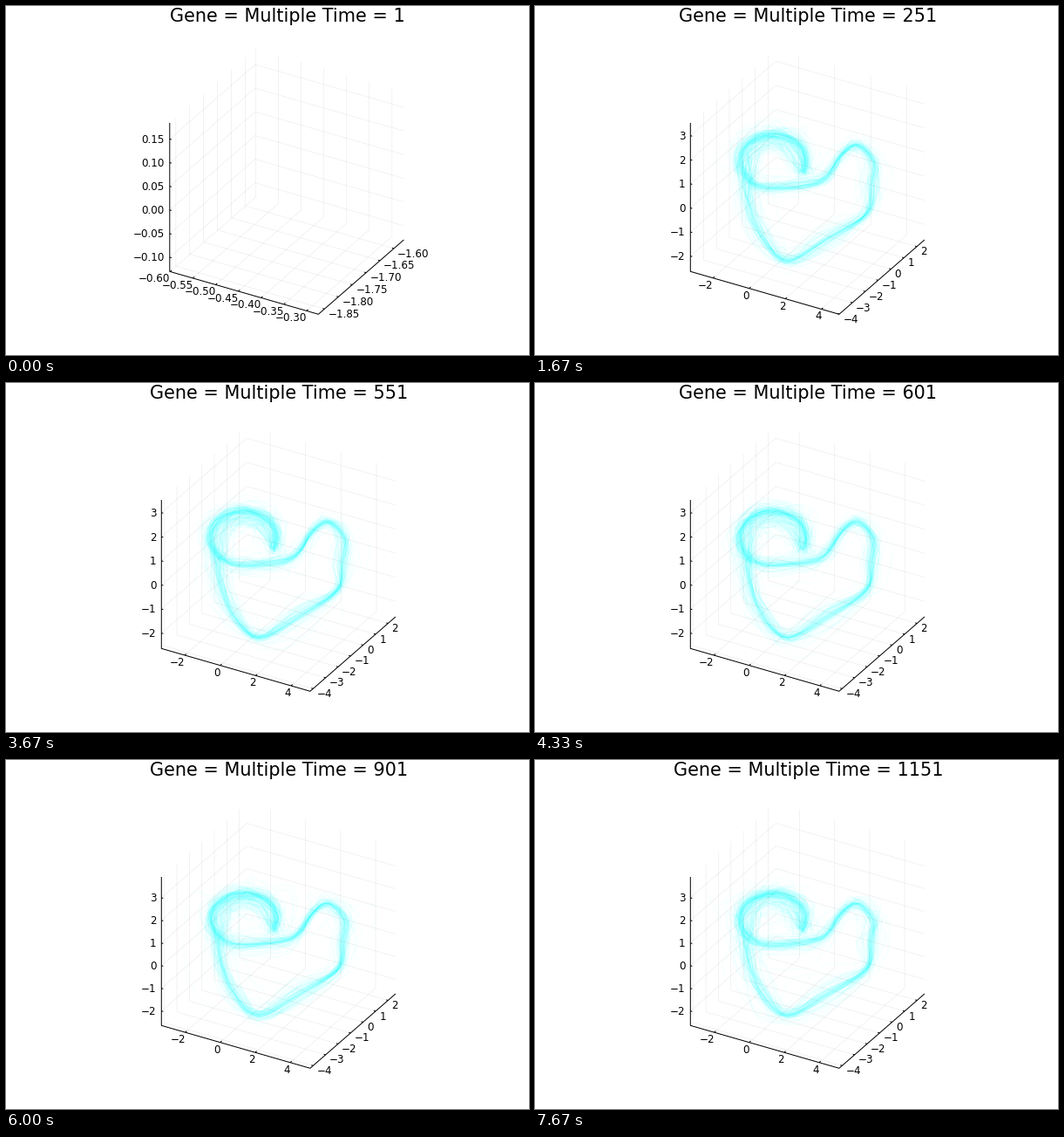
A matplotlib script for the animation above (8000 ms loop, 600 by 400 pixels).

```python
import numpy as np
import matplotlib.pyplot as plt
from matplotlib.animation import FuncAnimation
from matplotlib.collections import LineCollection

W, H, DPI = 600, 400, 100
PX = 72 / DPI
FRAMES, LOOP_MS = 24, 8000
STRANDS, DETAIL = 120, 5

# Screen directions of the three box edges
EDGE_X = np.array([170.6, 49.0])
EDGE_Y = np.array([98.0, -85.3])
EDGE_Z = np.array([0.0, -170.3])

# Key points of the long lobe on screen: x, y, spread
LOBE = np.array([
    (245, 225, 6), (261, 266, 6), (290, 292, 4), (335, 267, 7),
    (380, 238, 3), (386, 205, 6), (388, 178, 5), (370, 159, 4),
    (352, 170, 3), (334, 196, 4), (312, 205, 5)])
RING_CENTER, RING_RADII, RING_SPREAD = (273, 178), (38, 31), 5


def axis_limits(time):
    if time == 1:
        return (-0.601, -0.274), (-1.872, -1.564), (-0.130, 0.184)
    grown = min(time / 751, 1)
    return ((-3.2 - 0.16 * grown, 4.9 + 0.24 * grown),
            (-4.02 if time < 301 else -4.24, 2.6),
            (-2.64, 3.53 if time < 901 else 3.92))


def ticks(limits, step):
    low, high = limits
    first, last = np.ceil(low / step), np.floor(high / step)
    return [(v, (v - low) / (high - low))
            for v in np.arange(first, last + 1) * step]


def smooth_loop(points):
    """Closed Catmull-Rom curves; points has shape (strands, knots, 2)."""
    p0, p1, p2, p3 = (np.roll(points, s, axis=1)[:, :, None]
                      for s in (1, 0, -1, -2))
    u = np.linspace(0, 1, DETAIL, endpoint=False)[:, None]
    curve = 0.5 * (2 * p1 + (p2 - p0) * u
                   + (2 * p0 - 5 * p1 + 4 * p2 - p3) * u**2
                   + (3 * p1 - p0 - 3 * p2 + p3) * u**3)
    curve = curve.reshape(len(points), -1, 2)
    return np.concatenate([curve, curve[:, :1]], axis=1)


def ring(rng):
    """One turn around the ring, then back inside it over the top."""
    there = np.radians(np.linspace(100, 385, 9))
    back = np.radians(np.linspace(335, 175, 5))
    angle = np.concatenate([there, back])
    inner = rng.uniform(0.45, 1.15, (STRANDS, 1))
    radius = np.hstack([np.ones((STRANDS, len(there))),
                        np.repeat(inner, len(back), axis=1)])
    direction = np.stack([np.cos(angle), np.sin(angle)], axis=-1)
    return RING_CENTER + radius[..., None] * direction * RING_RADII


def strands(time, z_high):
    rng = np.random.default_rng(time)
    turns = ring(rng)
    lobe = np.broadcast_to(LOBE[:, :2], (STRANDS, len(LOBE), 2))
    points = np.concatenate([turns, lobe], axis=1)
    spread = np.append(np.full(turns.shape[1], RING_SPREAD), LOBE[:, 2])
    shift = rng.normal(size=(STRANDS, 1, 2))
    noise = 0.7 * rng.normal(size=points.shape) + 0.7 * shift
    noise *= rng.gamma(3, 1 / 3, (STRANDS, 1, 1))
    points = points + noise * spread[:, None]
    if z_high > 3.8:
        points[..., 1] = 297 + (points[..., 1] - 297) * 0.963
    return smooth_loop(points)


def label(x, y, text, align, size=11.9):
    ax.text(x, y, text.replace("-", "\u2212"), ha=align, va="baseline",
            fontsize=size * PX, family="DejaVu Sans", color="black")


def add_lines(paths, width, **style):
    ax.add_collection(LineCollection(paths, linewidths=width * PX, **style))


def draw(frame):
    ax.clear()
    ax.set(xlim=(0, W), ylim=(H, 0))
    ax.axis("off")

    time = 1 + 50 * frame
    start = time == 1
    x_lim, y_lim, z_lim = axis_limits(time)
    origin = np.array([187.8 if start else 178.3, 304.3])
    x_step, y_step, z_step = (0.05, 0.05, 0.05) if start else (2, 1, 1)
    fmt = "{:.2f}" if start else "{:.0f}"
    grid, marks = [], []

    for value, f in ticks(x_lim, x_step):
        p = origin + f * EDGE_X
        grid.append([p, p + EDGE_Y, p + EDGE_Y + EDGE_Z])
        marks.append([p, p + 0.018 * EDGE_Y])
        label(p[0] + 0.3, p[1] + 12, fmt.format(value), "right")
    for value, f in ticks(y_lim, y_step):
        left = origin + f * EDGE_Y
        p = left + EDGE_X
        grid.append([p, left, left + EDGE_Z])
        marks.append([p, p - 0.012 * EDGE_X])
        label(p[0] + 4.2, p[1] + 9.6, fmt.format(value), "left")
    for value, f in ticks(z_lim, z_step):
        p = origin + f * EDGE_Z
        grid.append([p, p + EDGE_Y, p + EDGE_Y + EDGE_X])
        marks.append([p, p + 0.012 * EDGE_X])
        label(p[0] - 6, p[1] + 4.4, fmt.format(value), "right")

    add_lines(grid, 0.7, colors="black", alpha=0.07)
    if not start:
        add_lines(strands(time, z_lim[1]), 1, colors="cyan", alpha=0.035)
    axes = [origin + EDGE_Z, origin, origin + EDGE_X, origin + EDGE_X + EDGE_Y]
    add_lines([axes] + marks, 1, colors="black")

    center = origin[0] + (EDGE_X[0] + EDGE_Y[0]) / 2
    label(center + 0.8, 18, f"Gene = Multiple Time = {time}", "center", 20.8)
    return []


fig = plt.figure(figsize=(W / DPI, H / DPI), dpi=DPI, facecolor="white")
ax = fig.add_axes([0, 0, 1, 1])
anim = FuncAnimation(fig, draw, frames=FRAMES, init_func=lambda: [],
                     interval=LOOP_MS / FRAMES, repeat=True, repeat_delay=0)
plt.show()
```
